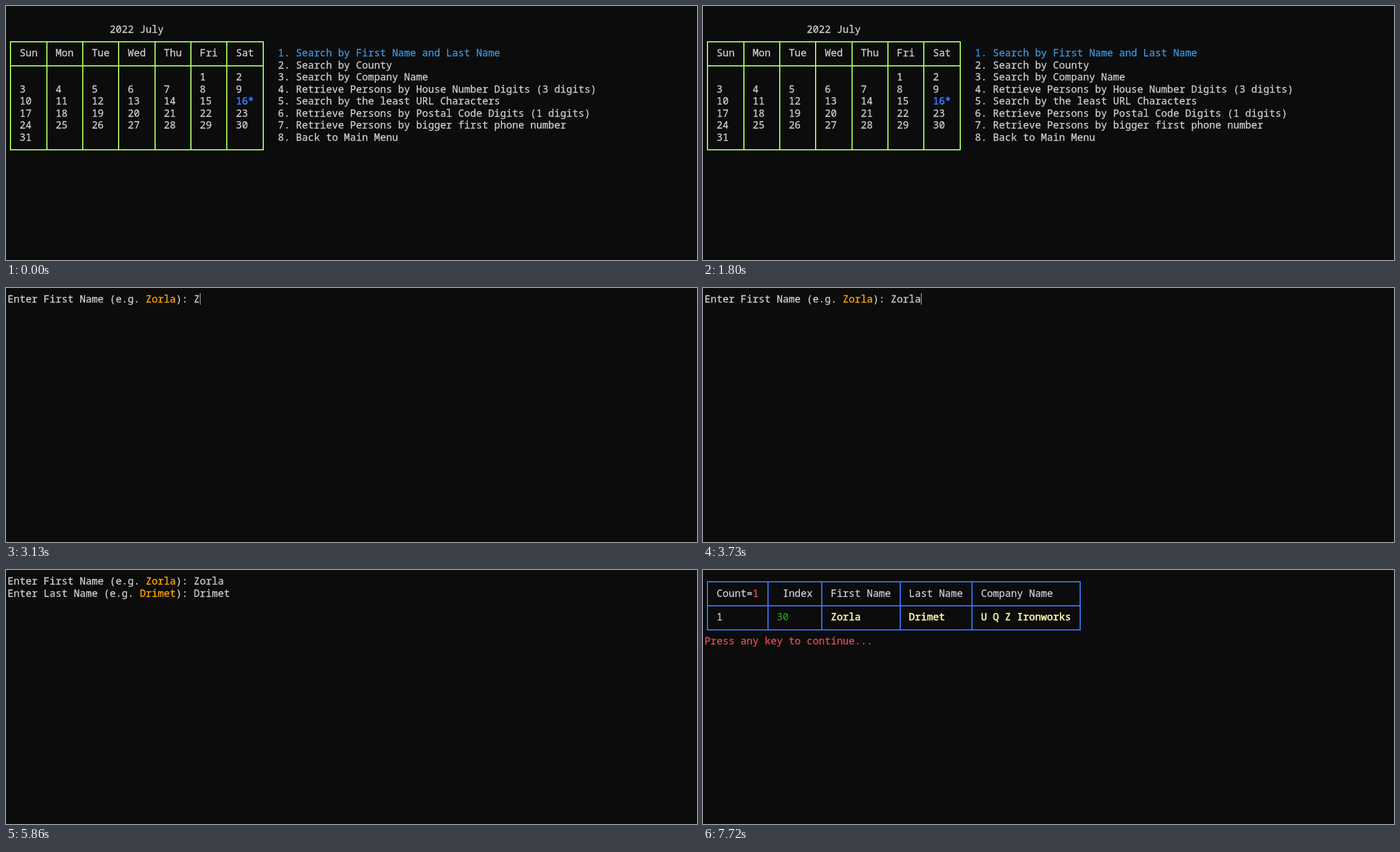
An HTML page with a canvas for the animation above (8 s loop, 1233x454 px).

```html
<!DOCTYPE html>
<html lang="en">
<head>
<meta charset="utf-8">
<title>Terminal search</title>
<style>
  html, body { margin: 0; width: 100%; height: 100%; overflow: hidden; background: #0c0c0c; }
  canvas { display: block; }
</style>
</head>
<body>
<canvas id="stage" width="1233" height="454"></canvas>
<script>
const ctx = document.getElementById('stage').getContext('2d');
const LOOP = 8000;
const CELL = 10.72, LINE = 21.43, LEFT = 3.1, TOP = 9;
const GREY = '#cccccc', CYAN = '#3a96dd', BLUE = '#3b78ff', LIME = '#afff5f',
      ORANGE = '#ffa500', RED = '#e74856', GREEN = '#13a10e', YELLOW = '#f9f1a5';

const FIRST = 'Zorla', LAST = 'Drimet', COMPANY = 'U Q Z Ironworks';
const FIRST_KEYS = [3130, 3270, 3530, 3630, 3730];
const LAST_KEYS = [4540, 4720, 4850, 5000, 5200, 5330];
const INPUT_COL = 31;

const MENU = [
  'Search by First Name and Last Name',
  'Search by County',
  'Search by Company Name',
  'Retrieve Persons by House Number Digits (3 digits)',
  'Search by the least URL Characters',
  'Retrieve Persons by Postal Code Digits (1 digits)',
  'Retrieve Persons by bigger first phone number',
  'Back to Main Menu'
];

// Text sits on a character grid, one glyph per cell; a thin outline sets its weight.
function print(text, col, row, color = GREY, bold = false) {
  ctx.font = `${CELL / 0.6}px "Noto Sans Mono", "DejaVu Sans Mono", monospace`;
  ctx.fillStyle = ctx.strokeStyle = color;
  ctx.lineWidth = bold ? 0.7 : 0.35;
  ctx.lineJoin = 'round';
  [...text].forEach((char, i) => {
    const x = LEFT - 0.3 + (col + i) * CELL, y = TOP + 17.2 + row * LINE;
    ctx.fillText(char, x, y);
    ctx.strokeText(char, x, y);
  });
}

function cursor(col, row) {
  const top = Math.round(TOP + row * LINE);
  ctx.fillStyle = GREY;
  ctx.fillRect(Math.floor(LEFT + col * CELL), top, 1, Math.round(TOP + (row + 1) * LINE) - top);
}

function table(cols, rows, color) {
  const xs = cols.map(col => Math.round(LEFT + (col + 0.5) * CELL) - 1);
  const ys = rows.map(row => Math.round(21.4 + row * LINE) - 1);
  const width = xs.at(-1) - xs[0] + 2, height = ys.at(-1) - ys[0] + 2;
  ctx.fillStyle = color;
  xs.forEach(x => ctx.fillRect(x, ys[0], 2, height));
  ys.forEach(y => ctx.fillRect(xs[0], y, width, 2));
}

function menuScreen(selected) {
  print('2022 July', 17, 1);
  table([0, 6, 12, 18, 24, 30, 36, 42], [2, 4, 11], LIME);
  ['Sun', 'Mon', 'Tue', 'Wed', 'Thu', 'Fri', 'Sat'].forEach((day, i) => print(day, 2 + 6 * i, 3));
  for (let day = 1; day <= 31; day++) {
    const slot = day + 4, today = day === 16;
    print(today ? day + '*' : String(day), 2 + 6 * (slot % 7), 5 + Math.floor(slot / 7),
      today ? BLUE : GREY, today);
  }
  MENU.forEach((item, i) => print(`${i + 1}. ${item}`, 45, 3 + i, i === selected ? CYAN : GREY));
}

function prompt(label, example, row, typed, showCursor) {
  const lead = `Enter ${label} Name (e.g. `;
  print(lead, 0, row);
  print(example, lead.length, row, ORANGE);
  print('):', lead.length + example.length, row);
  print(example.slice(0, typed), INPUT_COL, row);
  if (showCursor) cursor(INPUT_COL + typed, row);
}

function promptScreen(t) {
  const typedBy = keys => keys.filter(time => t >= time).length;
  prompt('First', FIRST, 0, typedBy(FIRST_KEYS), t < 3930);
  if (t >= 3930) prompt('Last', LAST, 1, typedBy(LAST_KEYS), t < 5860);
}

function resultScreen(showCursor) {
  table([0, 10, 19, 32, 44, 62], [0, 2, 4], BLUE);
  print('Count=', 2, 1);
  print('1', 8, 1, RED);
  print('Index', 13, 1);
  print('First Name', 21, 1);
  print('Last Name', 34, 1);
  print('Company Name', 46, 1);
  print('1', 2, 3);
  print('30', 12, 3, GREEN);
  print(FIRST, 21, 3, YELLOW, true);
  print(LAST, 34, 3, YELLOW, true);
  print(COMPANY, 46, 3, YELLOW, true);
  print('Press any key to continue...', 0, 5, RED);
  if (showCursor) cursor(0, 6);
}

function draw(t) {
  ctx.fillStyle = '#0c0c0c';
  ctx.fillRect(0, 0, 1233, 454);
  if (t < 2260) menuScreen(t >= 1410 && t < 1800 ? 1 : 0);
  else if (t < 6060) promptScreen(t);
  else resultScreen(t < 6660 || (t >= 7190 && t < 7720));
}

const start = performance.now();
function tick() {
  draw((performance.now() - start) % LOOP);
  requestAnimationFrame(tick);
}
tick();
</script>
</body>
</html>
```
